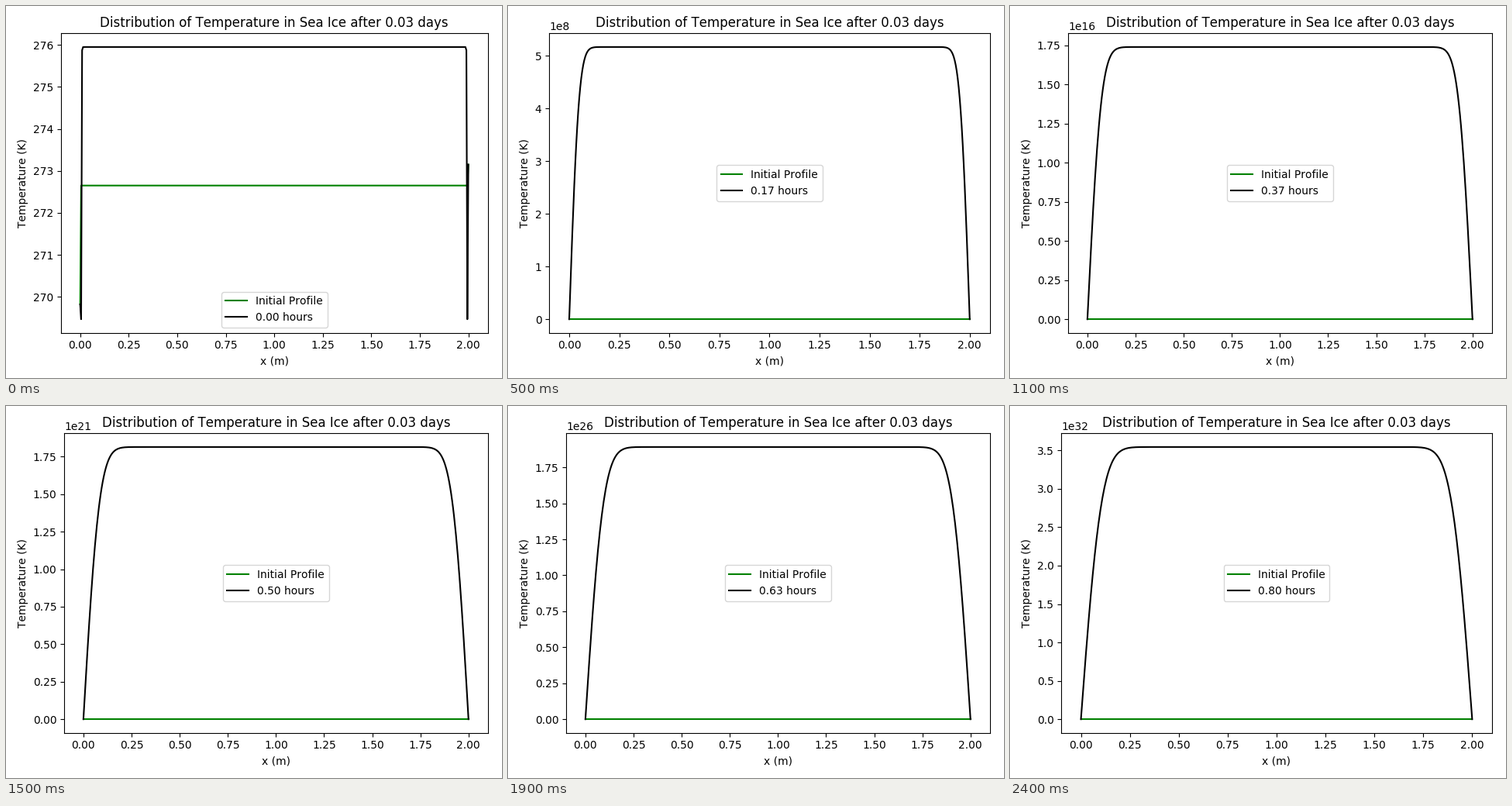
Animation of 640 by 480 pixels, one loop 2.5 s. Source, as a matplotlib script:

```python
import numpy as np
import matplotlib.pyplot as plt
from matplotlib.animation import FuncAnimation

plt.rcParams["text.kerning_factor"] = 6   # whole-pixel glyph spacing

FRAMES, INTERVAL = 25, 100
STEPS = 240                      # time steps per frame
DT, DX, LENGTH = 0.5, 0.005, 2.0
ALPHA = 2.25 / (916.7 * 2027)    # thermal diffusivity of ice
T_AIR, T_ICE, T_SEA = 269.82, 272.65, 273.15
RIGHT, TOP = 621.6 / 640, 1 - 35.33 / 480

x = np.linspace(0, LENGTH, round(LENGTH / DX) + 1)
inner = len(x) - 2


def tridiag(side, mid):
    off = np.full(inner - 1, side)
    return np.diag(np.full(inner, mid)) + np.diag(off, 1) + np.diag(off, -1)


def with_ends(temps):
    return np.concatenate(([T_AIR], temps, [T_SEA]))


# Unstable implicit scheme: the interior grows by a factor 1 + r per step.
r = 0.5 * ALPHA * DT / DX**2
step = np.linalg.solve(tridiag(-r, 1 + 2 * r), tridiag(r, 1 - r))
leap = np.linalg.matrix_power(step, STEPS)

start = np.full(inner, T_ICE)
initial = with_ends(start)
state = step @ start
profiles = []
for _ in range(FRAMES):
    profiles.append(with_ends(state))
    state = leap @ state

fig, ax = plt.subplots(figsize=(6.4, 4.8), dpi=100)


def update(i):
    hours = i * STEPS * DT / 3600
    ax.clear()
    ax.plot(x, initial, color="green", label="Initial Profile")
    ax.plot(x, profiles[i], color="black", label=f"{hours:.2f} hours")
    ax.set_title("Distribution of Temperature in Sea Ice after 0.03 days")
    ax.set_xlabel("x (m)")
    ax.set_ylabel("Temperature (K)")
    ax.legend(loc="best")
    fig.tight_layout()
    fig.subplots_adjust(right=RIGHT, top=TOP)
    return ax.get_children()


anim = FuncAnimation(fig, update, frames=FRAMES, init_func=lambda: [],
                     interval=INTERVAL, repeat=True, repeat_delay=0)
plt.show()
```
